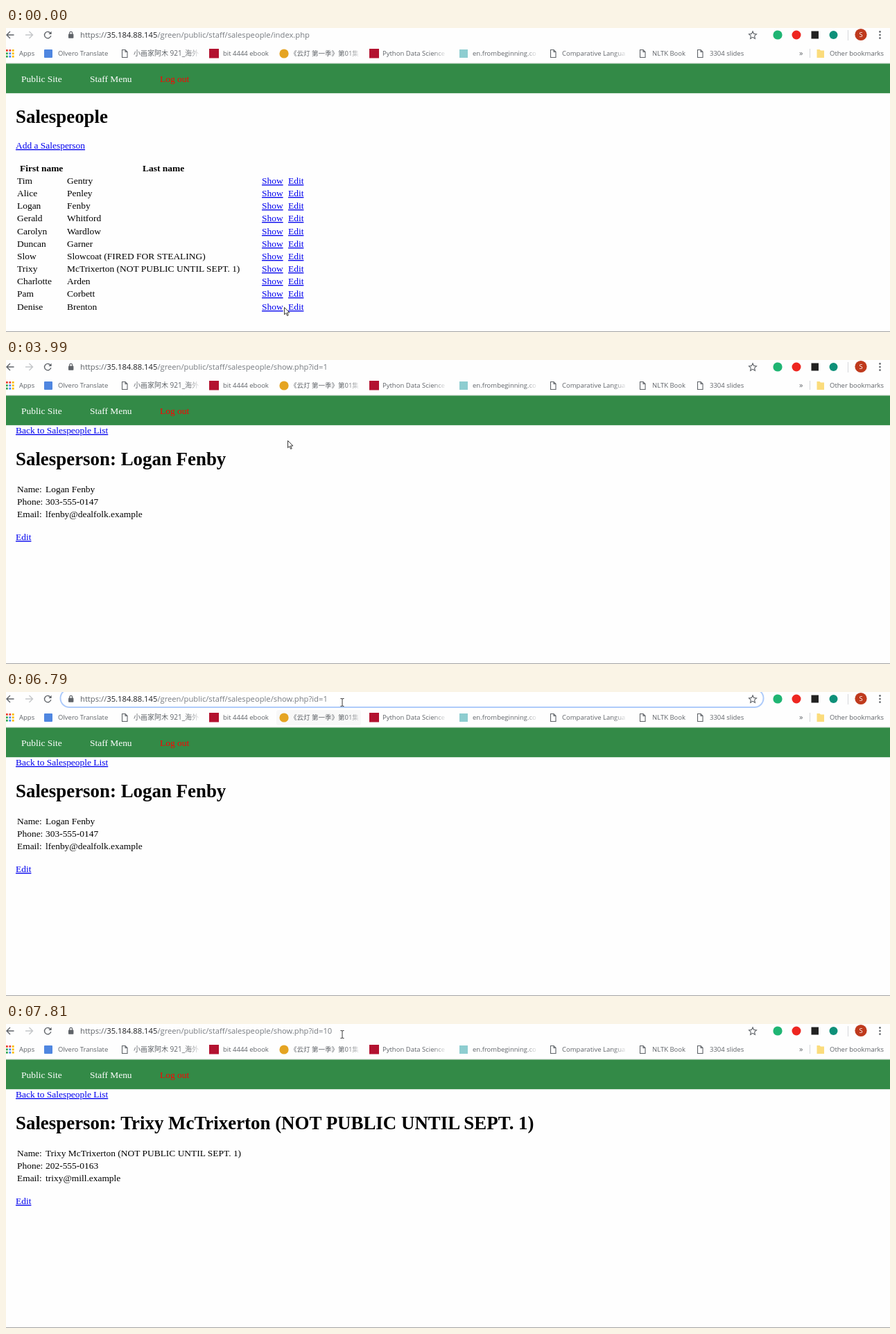
These frames come from a looping animation (1275 by 439 pixels, 8000 ms). An HTML page:

```html
<!DOCTYPE html>
<html lang="en">
<head>
<meta charset="utf-8">
<title>Salespeople</title>
<style>
html, body { margin: 0; width: 100%; height: 100%; overflow: hidden; background: #fefefe; }
svg { display: block; }
#stage { width: 100vw; height: 100vh; }
text { white-space: pre; }
.page { font: 13.44px "Liberation Serif", "Times New Roman", serif; fill: #000; }
.page .h1 { font-size: 26.9px; font-weight: 700; }
.page .b { font-weight: 700; }
.page .a { fill: #00e; text-decoration: underline; }
.marks { font: 9.5px "Open Sans", "Noto Sans CJK SC", "Noto Sans CJK", sans-serif; fill: #5f6368; }
.bar { font: 11.23px "Open Sans", sans-serif; fill: #333639; }
.line { fill: none; stroke: #5f6368; stroke-width: 1.4; }
.thin { stroke-width: 1.1; }

/* Timeline: hard cuts only */
.t { animation: 8s step-end infinite; }
#list { animation-name: list; }
@keyframes list { 0% { opacity: 1 } 40.5%, 100% { opacity: 0 } }
#first { animation-name: first; }
@keyframes first { 0% { opacity: 0 } 40.5% { opacity: 1 } 97.625%, 100% { opacity: 0 } }
#second { animation-name: second; }
@keyframes second { 0% { opacity: 0 } 97.625%, 100% { opacity: 1 } }
#stop { animation-name: stop; }
@keyframes stop { 0% { opacity: 0 } 34% { opacity: 1 } 40.5% { opacity: 0 } 95.625% { opacity: 1 } 97.625%, 100% { opacity: 0 } }
#reload { animation-name: reload; }
@keyframes reload { 0% { opacity: 1 } 34% { opacity: 0 } 40.5% { opacity: 1 } 95.625% { opacity: 0 } 97.625%, 100% { opacity: 1 } }
#urlList { animation-name: urlList; }
@keyframes urlList { 0% { opacity: 1 } 37.375%, 100% { opacity: 0 } }
#urlOne { animation-name: urlOne; }
@keyframes urlOne { 0% { opacity: 0 } 37.375% { opacity: 1 } 88.75%, 100% { opacity: 0 } }
#urlTen { animation-name: urlTen; }
@keyframes urlTen { 0% { opacity: 0 } 95.625%, 100% { opacity: 1 } }
#markHover { animation-name: markHover; }
@keyframes markHover { 0% { opacity: 0 } 53.25% { opacity: 1 } 88.75%, 100% { opacity: 0 } }
#barHover { animation-name: barHover; }
@keyframes barHover { 0% { opacity: 0 } 67.5% { opacity: 1 } 71%, 100% { opacity: 0 } }
#ring { animation-name: ring; }
@keyframes ring { 0% { opacity: 0 } 71% { opacity: 1 } 88.75%, 100% { opacity: 0 } }
#picked { animation-name: picked; }
@keyframes picked { 0% { opacity: 0 } 72.625% { opacity: 1 } 78%, 100% { opacity: 0 } }
#caret { animation-name: caret; }
@keyframes caret { 0% { opacity: 0 } 71% { opacity: 1 } 72.625% { opacity: 0 } 78% { opacity: 1 } 84.875%, 100% { opacity: 0 } }
#popup { animation-name: popup; }
@keyframes popup { 0% { opacity: 0 } 88.75% { opacity: 1 } 95.625%, 100% { opacity: 0 } }
#popCaret { animation-name: popCaret; }
@keyframes popCaret { 0% { opacity: 1 } 93.875%, 100% { opacity: 0 } }

#arrow { animation-name: arrow; }
@keyframes arrow { 0% { opacity: 1 } 6.25% { opacity: 0 } 9.25% { opacity: 1 } 16.75% { opacity: 0 } 49.875% { opacity: 1 } 67.5%, 100% { opacity: 0 } }
#hand { animation-name: hand; }
@keyframes hand { 0% { opacity: 0 } 6.25% { opacity: 1 } 9.25% { opacity: 0 } 16.75% { opacity: 1 } 49.875%, 100% { opacity: 0 } }
#beam { animation-name: beam; }
@keyframes beam { 0% { opacity: 0 } 67.5%, 100% { opacity: 1 } }
#pointer { animation-name: move; }
@keyframes move {
  0% { transform: translate(401px, 403px) }
  6.25% { transform: translate(412px, 340px) }
  7.75% { transform: translate(380px, 272px) }
  9.25% { transform: translate(360px, 242px) }
  11.125% { transform: translate(360px, 227px) }
  14.875% { transform: translate(364px, 227px) }
  16.75% { transform: translate(368px, 227px) }
  18.375% { transform: translate(376px, 227px) }
  20.25% { transform: translate(380px, 232px) }
  22.125% { transform: translate(382px, 243px) }
  23.625% { transform: translate(383px, 254px) }
  25.125% { transform: translate(383px, 262px) }
  32.125% { transform: translate(382px, 262px) }
  49.875% { transform: translate(406px, 116px) }
  51.625% { transform: translate(428px, 75px) }
  53.25% { transform: translate(453px, 40px) }
  55.125% { transform: translate(466px, 30px) }
  56.75% { transform: translate(477px, 21px) }
  65.75% { transform: translate(477px, 13px) }
  67.5%, 100% { transform: translate(485px, 15px) }
}
</style>
</head>
<body>
<svg id="stage" viewBox="0 0 1275 439" preserveAspectRatio="none">
  <defs>
    <linearGradient id="fade">
      <stop offset=".82" stop-color="#5f6368"/>
      <stop offset="1" stop-color="#5f6368" stop-opacity=".15"/>
    </linearGradient>
    <path id="doc" class="line thin" d="M.5 .5H5L8 3.5V11.5H.5ZM5 .5V3.5H8"/>
    <g id="globe">
      <circle r="5.4" fill="#5f6368"/>
      <path d="M-4.3-1.2L-1.2 1.6V4.2Q-4.4 3-4.3-1.2ZM0-4.3H2L1.6-2-.8-.8-2-2ZM1 .4H3.6L4 1.6 2.4 3.8Z" fill="#fff"/>
    </g>
  </defs>
  <rect width="1275" height="439" fill="#fefefe"/>

  <!-- Toolbar -->
  <g class="line">
    <path d="M11.5 10H1.5M6 5L1 10L6 15"/>
    <path d="M28 10H38M33.5 5L38.5 10L33.5 15" stroke="#c4c6c9"/>
    <g id="reload" class="t"><path d="M64.2 7.6A4.7 4.7 0 1 0 64.8 11.2"/><path d="M65.6 4.8V9H61.4Z" fill="#5f6368" stroke="none"/></g>
    <path id="stop" class="t" d="M56 6L64.5 14.5M64.5 6L56 14.5"/>
  </g>
  <rect id="barHover" class="t" x="78" y="-4" width="1015" height="27" rx="13" fill="#f1f3f4"/>
  <rect id="ring" class="t" x="78.5" y="-4" width="1014" height="26" rx="13" fill="#fff" stroke="#aecbfa" stroke-width="2"/>
  <rect x="90" y="8.6" width="7.4" height="6.2" rx=".8" fill="#5f6368"/>
  <path class="line thin" d="M91.7 9V7.4a2 2 0 0 1 4 0V9"/>
  <path class="line thin" d="M1077 4.8l1.6 3.6 3.9.4-2.9 2.6.8 3.9-3.4-2-3.4 2 .8-3.9-2.9-2.6 3.9-.4Z"/>
  <g class="bar">
    <text id="urlList" class="t" x="107" y="14" data-path="index.php"/>
    <text id="urlOne" class="t" x="107" y="14" data-path="show.php?id=1"/>
    <text id="urlTen" class="t" x="107" y="14" data-path="show.php?id=10"/>
    <g id="picked" class="t">
      <rect x="107" y="1" width="357" height="18" fill="#3297fd"/>
      <text x="107" y="14" fill="#fff" data-path="show.php?id=1" data-plain="1"/>
    </g>
    <rect id="caret" class="t" x="464" y="1" width="1" height="16" fill="#333"/>
  </g>
  <circle cx="1113" cy="10" r="6.6" fill="#1fb573"/>
  <circle cx="1140" cy="10" r="6.5" fill="#ee2620"/>
  <rect x="1161.5" y="4.5" width="10.5" height="11" fill="#222"/>
  <circle cx="1193.5" cy="10" r="6" fill="#0d9079"/>
  <path d="M1214.5 3V18" stroke="#d5d7da"/>
  <circle cx="1233" cy="9.5" r="8.6" fill="#bf3a1d"/>
  <text x="1233" y="13" text-anchor="middle" fill="#fff" font-family="Open Sans, sans-serif" font-size="9.5">S</text>
  <g fill="#5f6368"><circle cx="1260.5" cy="5.4" r="1.3"/><circle cx="1260.5" cy="10" r="1.3"/><circle cx="1260.5" cy="14.6" r="1.3"/></g>

  <!-- Bookmarks -->
  <rect id="markHover" class="t" x="390" y="26" width="122" height="22" rx="3" fill="#f8f8f8"/>
  <g id="apps"></g>
  <rect x="55" y="31" width="12" height="12" rx="1" fill="#4f86e0"/>
  <rect x="293" y="30" width="14" height="13.5" fill="#b31230"/>
  <circle cx="401" cy="37" r="6.6" fill="#e5a422"/>
  <rect x="524" y="30" width="14" height="13.5" fill="#b31230"/>
  <rect x="654" y="31" width="12" height="12" fill="#8ecdd0"/>
  <use href="#doc" x="167" y="31"/><use href="#doc" x="785" y="31"/>
  <use href="#doc" x="914" y="31"/><use href="#doc" x="997" y="31"/>
  <path d="M1159.5 30V43" stroke="#d5d7da"/>
  <path d="M1169.5 31H1173.5L1175 32.5H1180V43H1169.5Z" fill="#fbdc7c"/>
  <g class="marks">
    <text x="19" y="40">Apps</text>
    <text x="75" y="40">Olvero Translate</text>
    <text x="184" y="40" fill="url(#fade)" style="font-size:10px">小画家阿木 921_海外</text>
    <text x="313" y="40">bit 4444 ebook</text>
    <text x="410" y="40" fill="url(#fade)">《云灯 第一季》第01集</text>
    <text x="543" y="40" fill="url(#fade)">Python Data Science</text>
    <text x="673" y="40" fill="url(#fade)">en.frombeginning.co</text>
    <text x="802" y="40" fill="url(#fade)">Comparative Langua</text>
    <text x="932" y="40">NLTK Book</text>
    <text x="1015" y="40">3304 slides</text>
    <text x="1144" y="40" style="font-size:11px">»</text>
    <text x="1188" y="40">Other bookmarks</text>
  </g>

  <!-- Web page -->
  <g class="page">
    <path d="M0 50.5H1275" stroke="#e4e8e4"/>
    <rect y="51.4" width="1275" height="42.8" fill="#338a47"/>
    <text x="22" y="78" fill="#fff">Public Site</text>
    <text x="121" y="78" fill="#fff">Staff Menu</text>
    <text x="222" y="78" fill="#f00">Log out</text>
    <g id="list" class="t">
      <text class="h1" x="14" y="137">Salespeople</text>
      <text class="a" x="14" y="174">Add a Salesperson</text>
      <text class="b" x="20" y="207">First name</text>
      <text class="b" x="197" y="207">Last name</text>
      <g id="rows"></g>
    </g>
    <g id="first" class="t"></g>
    <g id="second" class="t"></g>
    <path d="M0 438.5H1275" stroke="#a3a3a3"/>
  </g>

  <!-- Suggestions -->
  <g id="popup" class="t bar">
    <rect x="73" y="-10" width="1025" height="99" rx="7" fill="#fbfbfb" style="filter:drop-shadow(0 4px 4px rgba(0,0,0,.36))"/>
    <use href="#globe" x="94" y="10"/>
    <use href="#globe" x="94" y="41"/>
    <g class="line"><circle cx="92.6" cy="71.4" r="3.4"/><path d="M95 74L98.6 77.6"/></g>
    <text x="116" y="14" data-path="show.php?id=10"/>
    <rect id="popCaret" class="t" x="479" y="1" width="1" height="16" fill="#333"/>
    <text x="116" y="45">Staff: Salesperson Trixy McTrixerton (NOT PUBLIC UNTIL SEPT. 1)</text>
    <text x="457" y="45" fill="#777b80">-</text>
    <text x="466" y="45" fill="#1a6fe0" style="font-size:11.4px;font-weight:700" data-path="show.php?id=10" data-plain="1"/>
    <text x="116" y="77" data-path="show.php?id=10" data-plain="1"/>
    <text x="483" y="77" fill="#777b80">- Olvero Search</text>
  </g>

  <!-- Pointer -->
  <g id="pointer" class="t" stroke="#222" stroke-width=".9" fill="#fff" stroke-linejoin="round">
    <path id="arrow" class="t" d="M.5 .5V10.8L2.9 8.6L4.6 12.5L6.2 11.8L4.5 8H7.9Z"/>
    <path id="hand" class="t" d="M3.5 9.5V1.7a1.2 1.2 0 0 1 2.4 0V6.2L9.9 7.1Q11.5 7.5 11.5 9V11Q11.5 13 10.5 14.4V15.8H4.6V14.4L1 10.3Q.3 9 1.4 8.7Q2.3 8.5 3.5 9.5ZM7.9 6.8V9M9.8 7.2V9.2"/>
    <path id="beam" class="t" fill="none" d="M-2.5-5.5H-.8L0-4.8L.8-5.5H2.5M0-5V5M-2.5 5.5H-.8L0 4.8L.8 5.5H2.5"/>
  </g>
</svg>
<script>
const $ = id => document.getElementById(id);
const txt = (x, y, s, cls = '') => `<text class="${cls}" x="${x}" y="${y}">${s}</text>`;
const rowY = (top, i) => Math.round(top + i * 18.15);

const people = [
  'Tim|Gentry', 'Alice|Penley', 'Logan|Fenby', 'Gerald|Whitford', 'Carolyn|Wardlow',
  'Duncan|Garner', 'Slow|Slowcoat (FIRED FOR STEALING)',
  'Trixy|McTrixerton (NOT PUBLIC UNTIL SEPT. 1)',
  'Charlotte|Arden', 'Pam|Corbett', 'Denise|Brenton'
];
$('rows').innerHTML = people.map((p, i) => {
  const [given, family] = p.split('|'), y = rowY(225, i);
  return txt(16, y, given) + txt(88, y, family) + txt(369, y, 'Show', 'a') + txt(407, y, 'Edit', 'a');
}).join('');

function detail(id, name, phone, email) {
  const rows = [['Name:', name], ['Phone:', phone], ['Email:', email]];
  $(id).innerHTML = txt(14, 106, 'Back to Salespeople List', 'a')
    + txt(14, 152, 'Salesperson: ' + name, 'h1')
    + rows.map(([k, v], i) => txt(16, rowY(191, i), k) + txt(57, rowY(191, i), v)).join('')
    + txt(14, 260, 'Edit', 'a');
}
detail('first', 'Logan Fenby', '303-555-0147', 'lfenby@dealfolk.example');
detail('second', 'Trixy McTrixerton (NOT PUBLIC UNTIL SEPT. 1)', '202-555-0163', 'trixy@mill.example');

// Address text: grey scheme and path around a dark host
for (const el of document.querySelectorAll('[data-path]')) {
  const parts = ['https://', '35.184.88.145', '/green/public/staff/salespeople/' + el.dataset.path];
  const inks = ['#5f6368', '#202124', '#777b80'];
  el.innerHTML = el.dataset.plain ? parts.join('')
    : parts.map((s, i) => `<tspan fill="${inks[i]}">${s}</tspan>`).join('');
}

const dots = ['#ea4335', '#ea4335', '#fbbc05', '#34a853', '#4285f4', '#fbbc05', '#34a853', '#4285f4', '#fbbc05'];
$('apps').innerHTML = dots.map((c, i) =>
  `<rect x="${i % 3 * 4.4}" y="${31 + Math.floor(i / 3) * 4.4}" width="2.8" height="2.8" fill="${c}"/>`).join('');
</script>
</body>
</html>
```
